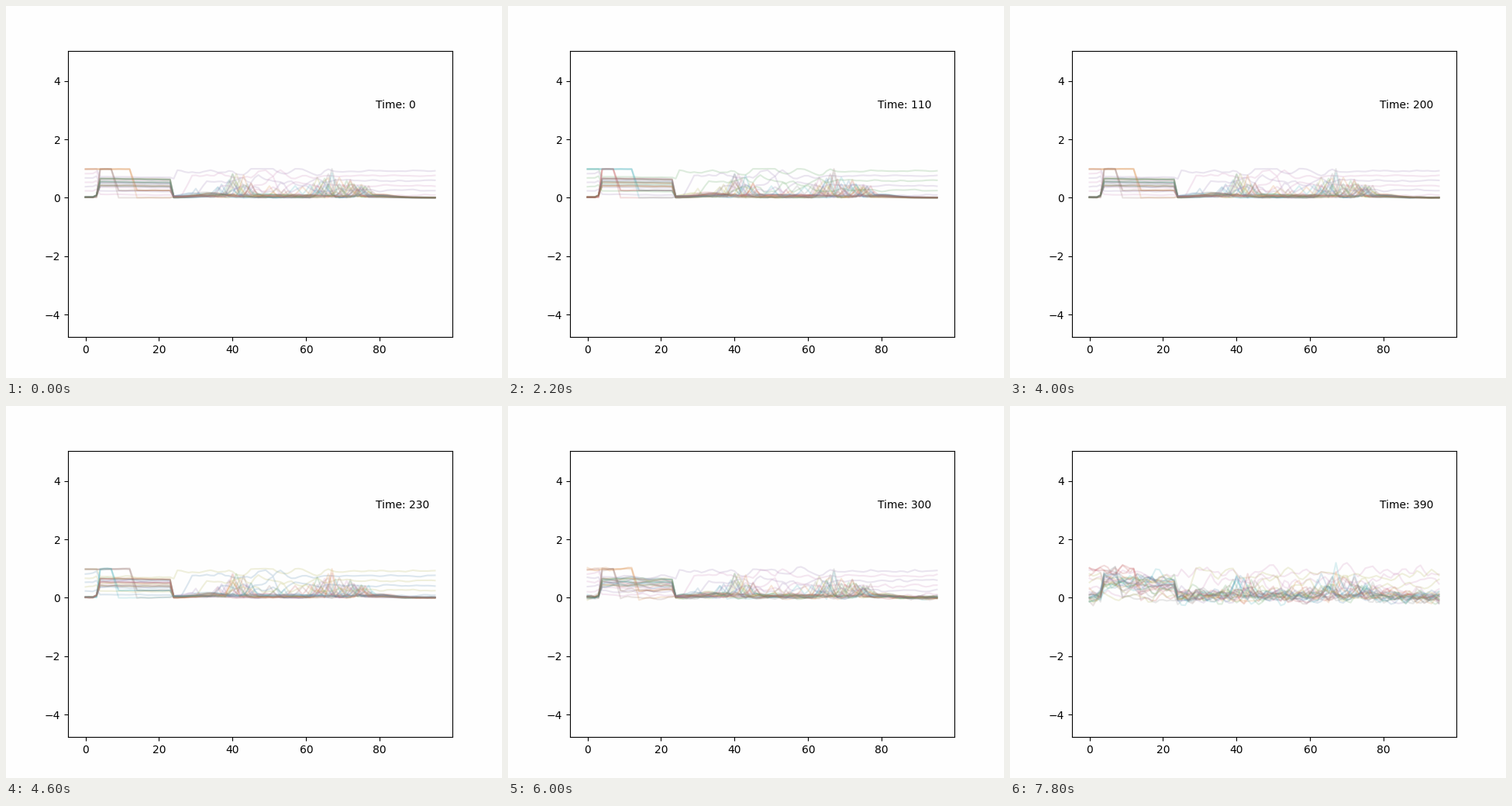
Recreate the animation shown at these times as a matplotlib script. Size 640 by 480 pixels, loop 8000 ms.

```python
import numpy as np
import matplotlib.pyplot as plt
from matplotlib.animation import FuncAnimation
from matplotlib.colors import to_rgb

FRAMES, STEP = 40, 10
COUNT, N = 28, 96
PAPER = "#fefefe"
x = np.arange(N)
rng = np.random.default_rng(4)


def smooth_noise(scale=1):
    e = rng.normal(size=N + 2)
    return scale * (.5 * e[:-2] + e[1:-1] + .5 * e[2:]) / 1.225


def bell(c, center, width):
    return np.exp(-((c - center) / width) ** 2)


def peaks():
    """Narrow spikes, tallest around hours 42 and 67."""
    centers = np.concatenate([rng.uniform(30, 78, 2),
                              rng.normal([42, 67, 74], [2.5, 3.5, 2])])
    tops = .4 + .6 * (bell(centers, 42, 4) + bell(centers, 67, 5))
    y = np.zeros(N)
    for c, top in zip(np.round(centers), tops):
        half = rng.uniform(1.5, 3)
        spike = top * rng.uniform(.1, 1) * np.clip(1 - abs(x - c) / half, 0, 1)
        y = np.maximum(y, spike)
    return y


def quiet_day():
    floor = .1 * rng.random() ** 2 * bell(x, 50, 30)
    bump = rng.uniform(0, .14) * bell(x, rng.uniform(28, 36), 4)
    tail = rng.uniform(0, .1) * bell(x, 80, 5)
    hum = np.abs(smooth_noise(.025)) * bell(x, 52, 24)
    return np.maximum(floor + bump + tail + hum, peaks())


def busy_day(rank):
    """Stays up until the end; lower ranks arrive later."""
    level = .92 - .168 * rank
    start = 22 + 4 * rank
    arrive = np.interp(x, [start, start + 3], [.05, level])
    wander = smooth_noise(.015) + .1 * bell(x, 50, 18) * smooth_noise()
    return arrive + wander * (x > start)


def profile(i):
    kind, turn = i % 10, i // 10
    rest = None
    if kind in (4, 6):
        rank = 2 * turn + (kind == 6)
        night, level = .98 - .15 * rank, .72 - .12 * rank
        day = busy_day(rank)
    else:
        night, level = .02, .66 - .12 * (i % 3) + rng.normal(0, .02)
        day = quiet_day()
    morning = np.interp(x, [2, 3, 4, 23], [night, night + .06, level, level - .03])
    if kind in (1, 5):
        fall = 12 if kind == 1 else 7
        rest = .25 if turn < 2 else 0
        night = .98 if kind == 1 else .02
        morning = np.interp(x, [3, 4, fall, fall + 2],
                            [night, .98, .98, rest])
    y = np.where(x < 24, morning + smooth_noise(.004), day)
    return np.clip(y, 0, .99)


def sigma(t):
    return .11 * np.exp((t - 390) / 66)


def color(n):
    return .68 * np.array(to_rgb(f"C{n % 10}")) + .32 * .55


base = np.array([profile(i) for i in range(COUNT)])

# noise accumulates step by step, its spread growing exponentially
states, drift, last = [], np.zeros_like(base), 0
for k in range(FRAMES):
    s = sigma(k * STEP)
    kick = np.array([smooth_noise() for _ in range(COUNT)])
    drift = drift + np.sqrt(s * s - last * last) * kick
    states.append(base + drift)
    last = s

fig, ax = plt.subplots(figsize=(6.4, 4.8), dpi=100, facecolor=PAPER)
ax.set_facecolor(PAPER)
lines = [ax.plot(x, y, alpha=.18, lw=1.5)[0] for y in base]
ax.set_xlim(-4.75, 99.75)
ax.set_ylim(-4.77, 5.035)
label = ax.text(.8, .8, "Time: 0", transform=ax.transAxes)


def update(k):
    for i, line in enumerate(lines):
        line.set_ydata(states[k][i])
        line.set_color(color(i + k * COUNT))
    label.set_text(f"Time: {k * STEP}")
    return lines + [label]


anim = FuncAnimation(fig, update, frames=FRAMES, interval=200, repeat=True,
                     repeat_delay=0)
plt.show()
```
